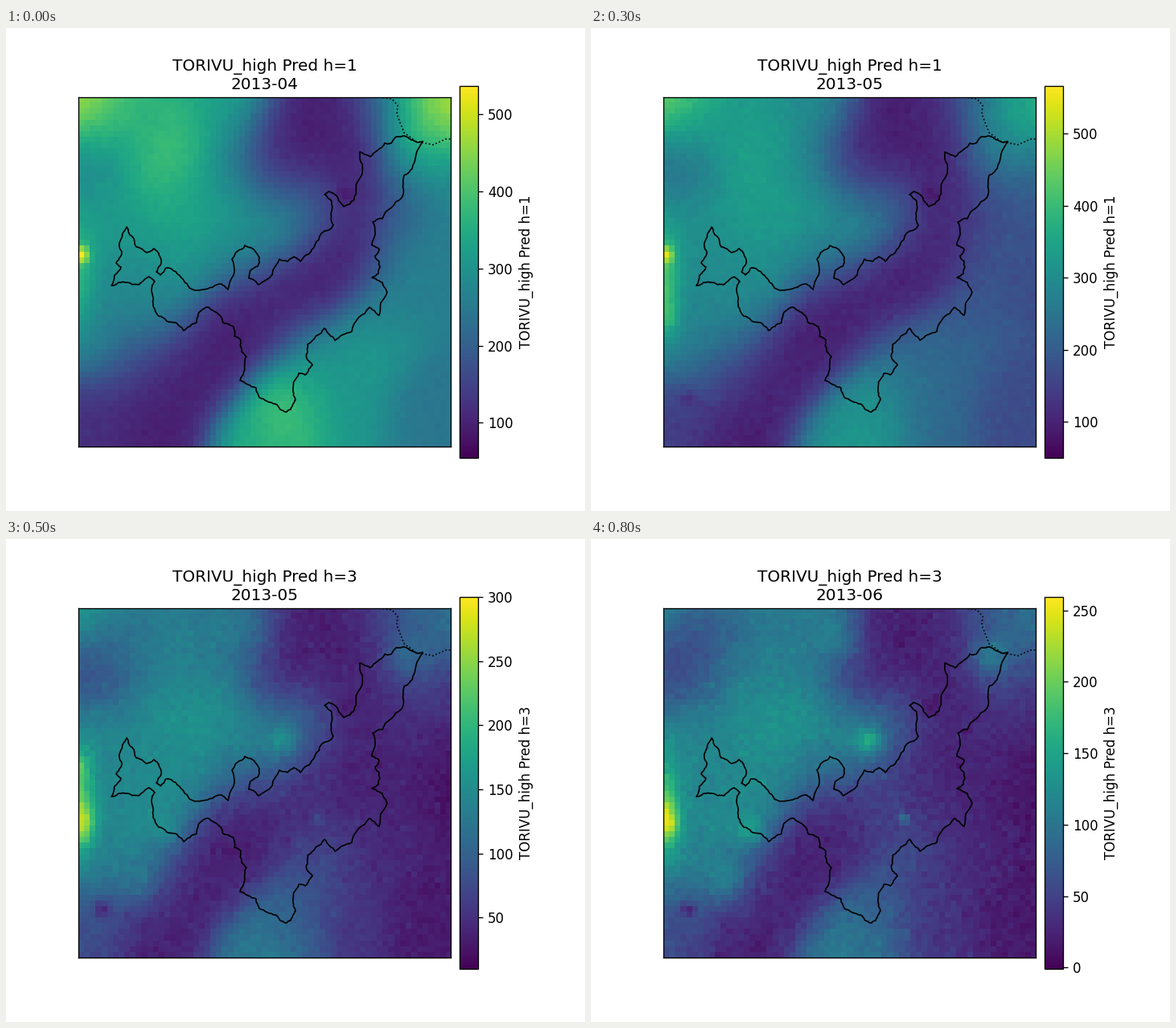
Animation, 720 px wide and 600 px high, one loop 0.9 s. Source, as a matplotlib script:

```python
import numpy as np
import matplotlib.pyplot as plt
from matplotlib.animation import FuncAnimation

W, H, DPI = 720, 600, 120
COLS, ROWS = 65, 61
LEFT, RIGHT, TOP, BOTTOM = 90, 553.14, 85.7, 520.3
NAME = "TORIVU_high"

plt.rcParams["font.family"] = "DejaVu Sans"

# Lowest and highest rainfall of each step.
LOWS = [54.6, 64.5, 18, 50.3, 8.9, 10, 21.6, -1, -0.85]
HIGHS = [536.5, 762.7, 402, 565.8, 370.8, 300, 338, 280, 259.3]

# Regions: x, y, level in the wet and in the dry season (percent of range).
REGIONS = [
    (95, 88, 90, 70), (150, 115, 62, 45), (205, 160, 70, 44), (285, 105, 57, 41),
    (470, 105, 38, 20), (525, 105, 92, 38), (515, 160, 66, 32), (105, 168, 48, 27),
    (285, 185, 47, 41), (120, 250, 55, 46), (215, 240, 60, 50), (265, 225, 58, 57),
    (338, 246, 56, 54), (375, 220, 46, 40), (490, 210, 24, 14), (545, 200, 46, 10),
    (495, 270, 45, 11), (550, 300, 42, 4), (150, 310, 47, 45), (215, 300, 52, 48),
    (290, 285, 42, 31), (110, 385, 46, 45), (190, 360, 44, 51), (170, 420, 20, 40),
    (120, 480, 14, 24), (475, 345, 43, 10), (450, 395, 54, 12), (385, 400, 50, 24),
    (348, 465, 72, 34), (300, 515, 62, 42), (420, 460, 52, 15), (530, 460, 39, 7),
]
# A dry corridor crosses the map.
CORRIDOR = [(340, 185), (350, 135), (415, 105), (420, 190), (430, 250),
            (395, 305), (330, 345), (265, 390), (210, 455), (190, 515)]
CORRIDOR_LEVEL = 8

# Changes late in the season: x, y, radius, percent.
LATE = [(115, 100, 70, -24), (310, 125, 32, 14), (345, 250, 16, 22), (200, 362, 17, 14),
        (170, 425, 25, 13), (388, 348, 7, 20), (365, 330, 65, 8), (495, 147, 22, 16)]

NORTH_EDGE = [
    (518, 141), (509, 141), (500, 136), (485, 135), (479, 143), (471, 143),
    (453, 160), (440, 154), (441, 185), (433, 213), (420, 222), (408, 206),
    (401, 203), (396, 207), (405, 215), (407, 245), (384, 270), (366, 290),
    (358, 284), (350, 290), (340, 287), (314, 319), (302, 311), (304, 301),
    (313, 296), (315, 285), (308, 275), (297, 270), (281, 287), (276, 325),
    (268, 318), (245, 325), (228, 323), (220, 312), (199, 298), (192, 307),
    (187, 303), (193, 292), (190, 280), (184, 274), (175, 279), (162, 272),
    (150, 247), (141, 267), (144, 280), (137, 292), (143, 297), (131, 320),
    (150, 316), (165, 319), (178, 309)]
SOUTH_EDGE = [
    (178, 309), (185, 315), (181, 325), (183, 345), (190, 358), (211, 366),
    (221, 376), (237, 366), (240, 353), (252, 347), (267, 358), (270, 366),
    (283, 371), (284, 383), (292, 388), (293, 402), (299, 408), (291, 438),
    (311, 447), (315, 459), (335, 467), (348, 477), (354, 474), (360, 462),
    (357, 452), (364, 429), (372, 431), (381, 419), (374, 410), (375, 393),
    (396, 373), (409, 388), (430, 377), (452, 347), (464, 357), (474, 328),
    (468, 316), (455, 310), (463, 305), (464, 290), (459, 283), (464, 275),
    (455, 270), (456, 241), (468, 237), (492, 211), (495, 183), (505, 175),
    (518, 141)]
COAST = [(464, 86), (480, 88), (487, 96), (486, 107), (495, 130), (510, 141),
         (531, 145), (540, 141), (547, 138), (553, 138)]


def roughen(points, seed, rounds=3, amount=0.13):
    """Midpoint displacement: a natural, slightly jagged border."""
    rng = np.random.default_rng(seed)
    pts = np.array(points, float)
    for _ in range(rounds):
        step = np.diff(pts, axis=0)
        normal = np.column_stack([-step[:, 1], step[:, 0]])
        mid = pts[:-1] + step / 2 + normal * rng.uniform(-amount, amount, (len(step), 1))
        out = np.empty((len(pts) + len(mid), 2))
        out[0::2], out[1::2] = pts, mid
        pts = out
    return pts


def resample(points, count):
    pts = np.array(points, float)
    along = np.r_[0, np.hypot(*np.diff(pts, axis=0).T).cumsum()]
    at = np.linspace(0, along[-1], count)
    return np.column_stack([np.interp(at, along, axis) for axis in pts.T])


cell_w, cell_h = (RIGHT - LEFT) / COLS, (BOTTOM - TOP) / ROWS
gx, gy = np.meshgrid(LEFT + cell_w * (np.arange(COLS) + 0.5),
                     TOP + cell_h * (np.arange(ROWS) + 0.5))


def bump(x, y, rx, ry=None):
    return np.exp(-((gx - x) / rx) ** 2 - ((gy - y) / (ry or rx)) ** 2)


def blend(sites, reach=50):
    """Average of the site levels, weighted by nearness."""
    weights = [bump(x, y, reach) for x, y, _ in sites]
    return sum(w * s[2] for w, s in zip(weights, sites)) / sum(weights)


corridor = [(x, y, CORRIDOR_LEVEL) for x, y in resample(CORRIDOR, 18)]
wet = blend([(x, y, a) for x, y, a, _ in REGIONS] + corridor)
dry = blend([(x, y, b) for x, y, _, b in REGIONS] + corridor)
late_change = sum(up * bump(x, y, r) for x, y, r, up in LATE)


def rainfall(i):
    stage = i // 3 + i % 3  # months from the first forecast to the predicted one
    d, late = min(stage / 2, 1), max(stage / 2 - 1, 0)
    z = wet + (dry - wet) * d + late * late_change
    z += (15 + 19 * d - 6 * late) * bump(90, 315 + 20 * late, 20, 62)
    z += (38 - 18 * d) * (1 - late) * bump(94, 282, 9, 10)
    z += (20 * d + 8 * late) * bump(96, 360 - 8 * late, 14, 22)
    z -= 7 * bump(421, 208, 12) + 15 * d * bump(120, 460, 10)
    rng = np.random.default_rng(40 + i)
    z += rng.normal(0, 0.6 + 0.25 * stage, z.shape)
    return LOWS[i] + (HIGHS[i] - LOWS[i]) * np.clip(z / 100, 0.01, 1)


fig = plt.figure(figsize=(W / DPI, H / DPI), dpi=DPI, facecolor="white")


def stage_axes(x0, y0, x1, y1):
    return fig.add_axes([x0 / W, 1 - y1 / H, (x1 - x0) / W, (y1 - y0) / H])


ax = stage_axes(LEFT, TOP, RIGHT, BOTTOM)
cax = stage_axes(564.3, 72, 587.4, 534)

im = ax.imshow(rainfall(0), cmap="viridis", aspect="auto",
               interpolation="nearest", extent=(LEFT, RIGHT, BOTTOM, TOP))
border = np.vstack([roughen(NORTH_EDGE, 3), roughen(SOUTH_EDGE, 8)])
ax.plot(*border.T, color="black", lw=1, solid_joinstyle="round")
ax.plot(*np.array(COAST).T, color="black", lw=1, ls=":")
ax.set(xlim=(LEFT, RIGHT), ylim=(BOTTOM, TOP), xticks=[], yticks=[])
title = ax.set_title("")
bar = fig.colorbar(im, cax=cax)


def draw(i):
    label = f"{NAME} Pred h={1 + i % 3}"
    im.set_data(rainfall(i))
    im.set_clim(LOWS[i], HIGHS[i])
    title.set_text(f"{label}\n2013-{4 + i // 3:02d}")
    bar.set_label(label)
    return im, title


anim = FuncAnimation(fig, draw, frames=len(LOWS), interval=100,
                     repeat=True, repeat_delay=0, blit=False)
plt.show()
```
